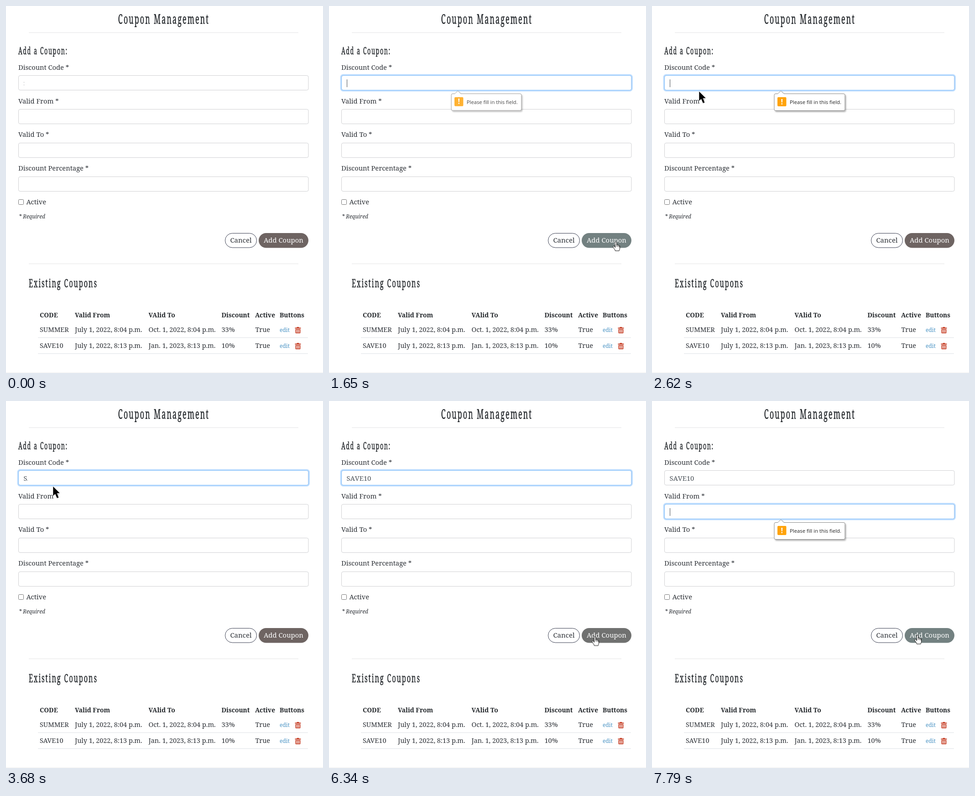
Recreate the animation shown at these times as an HTML page. Size 695 px wide and 805 px high, loop 7.99 s.

```html
<!DOCTYPE html>
<html lang="en">
<head>
<meta charset="utf-8">
<title>Coupon Management</title>
<style>
html, body { margin: 0; width: 100%; height: 100%; overflow: hidden; background: #fff; }
svg { display: block; width: 695px; height: 805px; }
text { font: 14.7px "Noto Serif", serif; fill: #2b2f35; }
.display text { font-size: 29px; letter-spacing: .14em; fill: #212529; stroke: #212529; stroke-width: .5px; }
.display .mid { font-size: 26.3px; }
.display .small { font-size: 22.6px; }
.btn { font-size: 14.9px; }
.head text { font-size: 13.8px; font-weight: 600; fill: #212529; }
.row text { font-size: 14.45px; }
.row .edit { font-size: 12px; fill: #4a93c4; }
.note { font-size: 11.8px; font-style: italic; }
.typed { fill: #495057; font-kerning: none; }
.hint { font: 11.3px "Open Sans", sans-serif; fill: #222; }
.bang { font: 700 16px "Open Sans", sans-serif; fill: #fff; }
.rule { stroke: #e4e4e5; }
.line { stroke: #dee2e6; }
.field { fill: #fff; stroke: #d0d1d4; }

.anim { animation: 7990ms linear infinite; }
.step { animation-timing-function: step-end; }
#cursor { animation-name: move; }
#arrow { animation-name: arrow; }
#hand { animation-name: hand; }
#add { animation-name: hover; }
#ring1 { animation-name: ring1; }
#ring2 { animation-name: ring2; }
#tip1 { animation-name: tip1; }
#tip2 { animation-name: tip2; }
#tip1, #tip2 { transform-origin: 282px 186px; }
#typing { animation-name: typing; }
#caret1 { animation-name: blink1; }
#caret2 { animation-name: blink2; }

@keyframes move {
  0%, 1.62% { transform: translate(419px, 840px); }
  1.63% { transform: translate(419px, 785px); animation-timing-function: ease-out; }
  6.88%, 9.6% { transform: translate(621px, 537px); }
  12.5%, 27.2% { transform: translate(629px, 517px); }
  28.8% { transform: translate(600px, 490px); animation-timing-function: ease-out; }
  32.5%, 75.09% { transform: translate(103px, 187px); animation-timing-function: ease-in-out; }
  78.5% { transform: translate(568px, 505px); }
  79.3%, 82% { transform: translate(583px, 516.5px); }
  84.2%, 85.5% { transform: translate(586px, 514px); }
  89% { transform: translate(592px, 516px); }
  94.5%, 100% { transform: translate(582px, 513px); }
}
@keyframes arrow { 0%, 28.6% { opacity: 1; } 11%, 78.5%, 100% { opacity: 0; } }
@keyframes hand { 0%, 28.6% { opacity: 0; } 11%, 78.5%, 100% { opacity: 1; } }
@keyframes hover {
  0%, 11%, 30.7%, 78.5% { fill: #6e6462; }
  12.9%, 28.8%, 80.4%, 100% { fill: #738181; }
}
@keyframes ring1 { 0%, 18.4%, 84.7%, 100% { opacity: 0; } 20.2%, 83.23% { opacity: 1; } }
@keyframes ring2 { 0%, 83.23% { opacity: 0; } 84.7%, 100% { opacity: 1; } }
@keyframes tip1 {
  0%, 18.4% { opacity: 0; transform: scale(.95); }
  21.1%, 39.42% { opacity: 1; transform: none; }
  41.05%, 100% { opacity: 0; transform: none; }
}
@keyframes tip2 {
  0%, 83.23% { opacity: 0; transform: scale(.95); }
  85.92%, 100% { opacity: 1; transform: none; }
}
@keyframes typing {
  0% { transform: translateX(39px); }
  39.42% { transform: translateX(47px); }
  47.31% { transform: translateX(57px); }
  48.56% { transform: translateX(66.5px); }
  51.06% { transform: translateX(75.5px); }
  67.71% { transform: translateX(83.8px); }
  68.59%, 100% { transform: translateX(92px); }
}
@keyframes blink1 {
  0%, 25.03%, 38.55%, 46.06%, 57.7%, 75.09%, 83.23%, 100% { opacity: 0; }
  18.4%, 31.66%, 39.42%, 47.31%, 64.33%, 81.8% { opacity: 1; }
}
@keyframes blink2 { 0%, 89.86% { opacity: 0; } 83.23%, 96.5%, 100% { opacity: 1; } }
</style>
</head>
<body>
<svg viewBox="0 0 695 805">
  <defs>
    <rect id="field" x="27.5" width="635.5" height="32" rx="3.5"/>
    <g id="ring" fill="none">
      <rect x="26" y="151" width="638.5" height="35" rx="5" stroke="#bfdeff" stroke-width="3"/>
      <rect x="27.5" y="152.5" width="635.5" height="32" rx="3.5" stroke="#86bff8"/>
    </g>
    <g id="trash" fill="#c8452d">
      <path d="M637.5 704h5v1.5h4v2h-13v-2h4z"/>
      <path fill-rule="evenodd" d="M634.5 708.5h11v8a1.5 1.5 0 0 1-1.5 1.5h-8a1.5 1.5 0 0 1-1.5-1.5zM636.5 710v6.5h1.4v-6.5zM639.3 710v6.5h1.4v-6.5zM642.1 710v6.5h1.4v-6.5z"/>
    </g>
    <filter id="shadow" x="-10%" y="-20%" width="125%" height="150%">
      <feDropShadow dx="2" dy="2.5" stdDeviation="1.5" flood-opacity=".3"/>
    </filter>
    <g id="tip">
      <path d="M271 192.5H276L282.5 186 289 192.5H420a3 3 0 0 1 3 3V226.500a3 3 0 0 1-3 3H271a3 3 0 0 1-3-3V195.500a3 3 0 0 1 3-3z" fill="#fff" stroke="#8a8a8a" filter="url(#shadow)"/>
      <rect x="275" y="200" width="19.500" height="20" rx="2" fill="#ffa30a"/>
      <text class="bang" x="284.8" y="215.500" text-anchor="middle">!</text>
      <text class="hint" x="302" y="215">Please fill in this field.</text>
    </g>
  </defs>

  <path class="rule" d="M50 58.500H641M50 565.500H641"/>
  <path d="M0 804.500H695" stroke="#efefef"/>
  <g class="display">
    <g transform="translate(346 39) scale(.55 1)"><text text-anchor="middle">Coupon Management</text></g>
    <g transform="translate(27 106) scale(.55 1)"><text class="small">Add a Coupon:</text></g>
    <g transform="translate(50 616.500) scale(.55 1)"><text class="mid">Existing Coupons</text></g>
  </g>

  <text x="27" y="140">Discount Code *</text>
  <text x="27" y="213.700">Valid From *</text>
  <text x="27" y="287.400">Valid To *</text>
  <text x="27" y="361">Discount Percentage *</text>
  <g class="field">
    <use href="#field" y="152.500"/>
    <use href="#field" y="226.500"/>
    <use href="#field" y="300.500"/>
    <use href="#field" y="374.500"/>
  </g>
  <rect x="27.500" y="424.500" width="11" height="11" rx="2" fill="#fff" stroke="#767676"/>
  <text x="44.500" y="435">Active</text>
  <text class="note" x="28" y="466">* Required</text>

  <rect x="480.500" y="498.500" width="69" height="31.500" rx="15.750" fill="#fff" stroke="#3b3f52"/>
  <text class="btn" x="515" y="519" text-anchor="middle">Cancel</text>
  <rect id="add" class="anim" x="554" y="498" width="109" height="32.500" rx="16.250"/>
  <text class="btn" x="608.500" y="519" text-anchor="middle" style="fill:#fff">Add Coupon</text>

  <g class="head">
    <text x="74" y="682.500">CODE</text>
    <text x="151" y="682.500">Valid From</text>
    <text x="312.500" y="682.500">VAlid To</text>
    <text x="472.500" y="682.500">Discount</text>
    <text x="546" y="682.500">Active</text>
    <text x="600" y="682.500">Buttons</text>
  </g>
  <g class="row">
    <text x="74" y="714.500">SUMMER</text>
    <text x="151" y="714.500">July 1, 2022, 8:04 p.m.</text>
    <text x="312.500" y="714.500">Oct. 1, 2022, 8:04 p.m.</text>
    <text x="472.500" y="714.500">33%</text>
    <text x="546.500" y="714.500">True</text>
    <text class="edit" x="600" y="714.500">edit</text>
    <use href="#trash"/>
  </g>
  <g class="row" transform="translate(0 35)">
    <text x="74" y="714.500">SAVE10</text>
    <text x="151" y="714.500">July 1, 2022, 8:13 p.m.</text>
    <text x="312.500" y="714.500">Jan. 1, 2023, 8:13 p.m.</text>
    <text x="472.500" y="714.500">10%</text>
    <text x="546.500" y="714.500">True</text>
    <text class="edit" x="600" y="714.500">edit</text>
    <use href="#trash"/>
  </g>
  <path class="line" d="M70 727.500H662M70 762.500H662"/>

  <!-- typed text, uncovered as the caret advances -->
  <text class="typed" x="38.500" y="174.500">SAVE10</text>
  <g id="typing" class="anim step">
    <rect x=".6" y="158" width="62" height="22" fill="#fff"/>
    <path id="caret1" class="anim step" d="M.5 161V178" stroke="#495057"/>
  </g>
  <path id="caret2" class="anim step" d="M39.500 235V252" stroke="#495057"/>

  <g id="ring1" class="anim"><use href="#ring"/></g>
  <g id="ring2" class="anim"><use href="#ring" y="74"/></g>
  <g id="tip1" class="anim"><use href="#tip"/></g>
  <g transform="translate(0 74)"><g id="tip2" class="anim"><use href="#tip"/></g></g>

  <g id="cursor" class="anim">
    <path id="arrow" class="anim step" d="M0 0V21.500L4.800 17.300 8.800 26.500 12.800 24.800 8.800 15.800 15.300 15.300z" fill="#000" stroke="#fff" stroke-width=".6"/>
    <g id="hand" class="anim step" stroke="#111" stroke-linejoin="round" stroke-linecap="round">
      <path d="M-1.700 2a1.700 1.700 0 0 1 3.400 0V7.200a1.600 1.500 0 0 1 2.800.6 1.600 1.500 0 0 1 2.600.8 1.300 1.300 0 0 1 1.500 1.400V14.500c0 2.500-1.400 3.500-1.400 5.500H-1.500c0-2.800-3.600-5.500-4.700-8.500-.6-2 1.500-2.500 2.800-.9l1.700 1.800z" fill="#fff"/>
      <path d="M1.700 7V10.500M4.500 8V11M7.100 9V11.500" fill="none" stroke-width=".9"/>
    </g>
  </g>
</svg>
</body>
</html>
```
